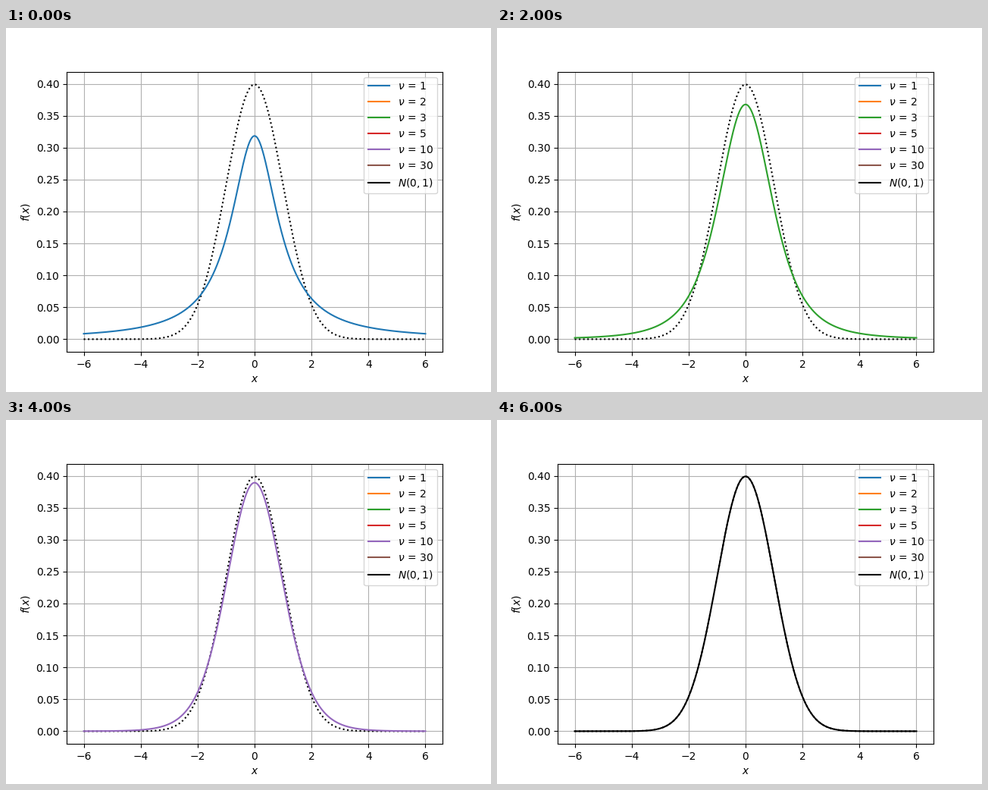
Animation of 640 by 480 pixels, one loop 7 s. Source, as a matplotlib script:

```python
import math

import numpy as np
import matplotlib.pyplot as plt
from matplotlib.animation import ArtistAnimation

DEGREES = [1, 2, 3, 5, 10, 30]


def normal_pdf(x):
    return np.exp(-x**2 / 2) / math.sqrt(2 * math.pi)


def student_pdf(x, nu):
    scale = math.gamma((nu + 1) / 2) / (math.sqrt(nu * math.pi) * math.gamma(nu / 2))
    return scale * (1 + x**2 / nu) ** (-(nu + 1) / 2)


fig, ax = plt.subplots(figsize=(6.4, 4.8), dpi=100)
x = np.linspace(-6, 6, 1000)

# The dotted limit stays visible beneath every curve.
ax.plot(x, normal_pdf(x), "k:")

frames = [
    ax.plot(x, student_pdf(x, nu), color=f"C{i}", label=rf"$\nu$ = {nu}")
    for i, nu in enumerate(DEGREES)
]
frames.append(ax.plot(x, normal_pdf(x), "k", label="$N(0, 1)$"))

ax.set_xlabel("$x$")
ax.set_ylabel("$f(x)$")
ax.grid()
ax.legend(loc="upper right")

anim = ArtistAnimation(fig, frames, interval=1000, repeat=True, repeat_delay=0)
plt.show()
```
